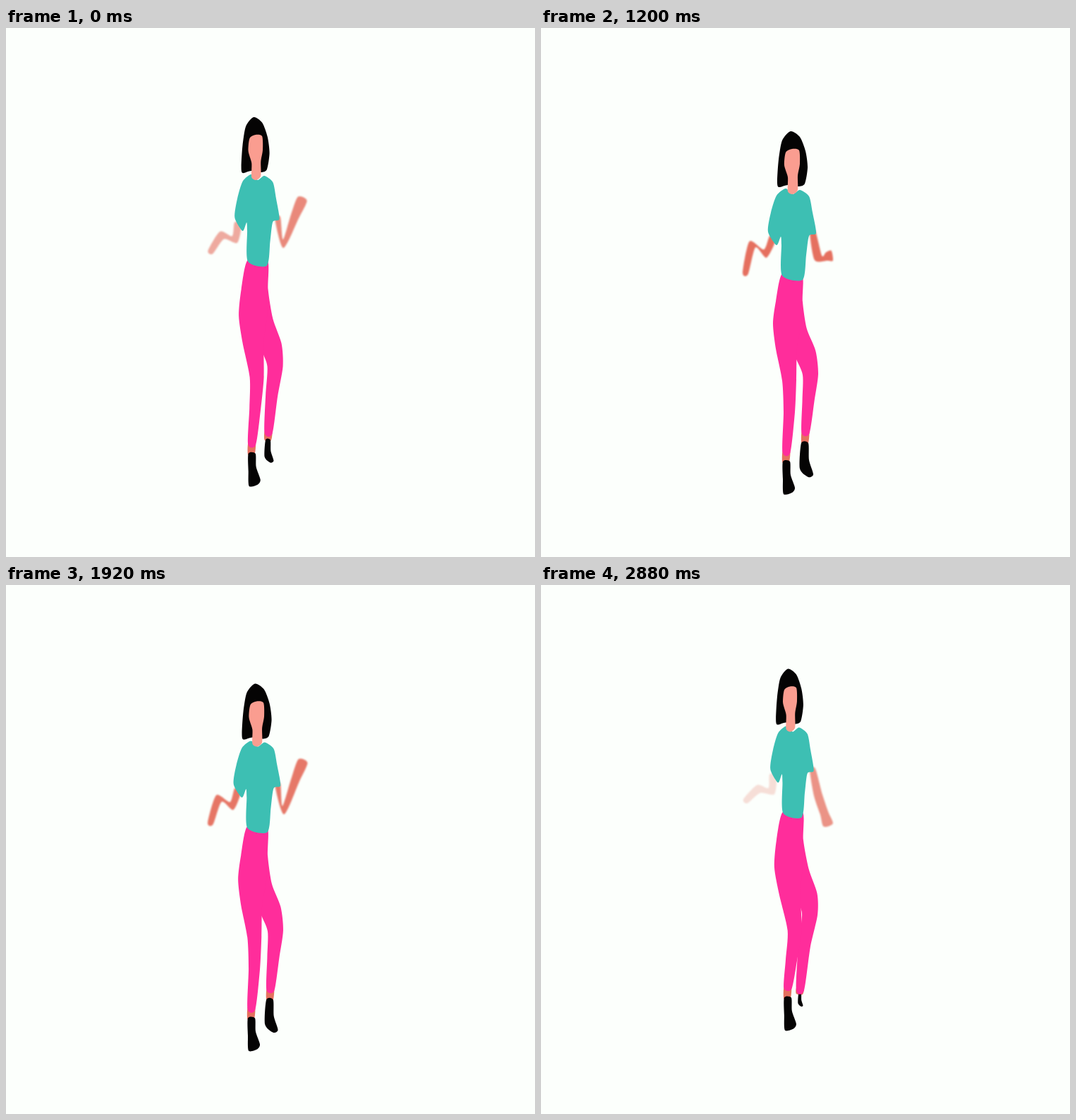
These frames come from a looping animation (748 px wide and 748 px high, 3000 ms). An HTML page with a canvas:

```html
<!DOCTYPE html>
<html lang="en">
<head>
<meta charset="utf-8">
<title>Dancer</title>
<style>
html, body { margin: 0; width: 100%; height: 100%; overflow: hidden; background: #fcfffc; }
canvas { display: block; width: 748px; height: 748px; }
</style>
</head>
<body>
<canvas id="stage" width="748" height="748"></canvas>
<script>
const ctx = document.getElementById('stage').getContext('2d');
const LOOP = 3000, STEP = 120, AXIS = 355;
const SKIN = '#fa9d90', ARM = '#e5705f', BLACK = '#050404', SHIRT = '#3dbfb3', PINK = '#ff2d9b';

// Head and shirt keep their shape; y is measured from the top of the head
const HAIR = [[353, 0], [366, 8], [374, 28], [377, 51], [373, 74], [364, 78], [349, 76], [336, 79], [334, 70], [336, 40], [341, 13]];
const FACE = [[346, 30], [355, 25], [365, 27], [366, 46], [363, 63], [363, 83], [356, 89], [349, 85], [349, 65], [344, 48]];
const BODICE = [[346, 81], [356, 89], [366, 83], [379, 92], [384, 115], [389, 144], [379, 148], [375, 175], [370, 210],
  [341, 204], [340, 161], [339, 149], [333, 161], [321, 142], [325, 115], [333, 91]];

// Leg joints: standing x, y, radius, then the shift at the top of a hop
const FRONT_LEG = [
  [355, 349, 14, 1, -27], [350, 388, 18, 1, -27], [348, 419, 20, 2, -21], [347, 453, 15, 5, -17],
  [351, 498, 10, 8, -10], [351, 543, 8, 3, -12], [347, 600, 5.5, 2, -31]
];
const BACK_LEG = [
  [355, 349, 14, 1, -27], [358, 388, 12, 1, -27], [361, 428, 15, 3, -24], [374, 461, 15, 2, -22],
  [381, 490, 11, -1, -25], [378, 527, 8.5, -6, -16], [374, 573, 5.5, -8, 0]
];

// Boots are placed relative to the end of the trouser leg
const FRONT_BOOT = [[-5, 13], [5, 13], [6, 32], [12, 50], [8, 57], [-4, 59], [-5, 38]];
const BACK_BOOT = [[-6, 14], [4, 14], [5, 38], [11, 58], [4, 62], [-8, 50]];

// Fills a smooth closed curve through the points
function blob(points, color) {
  const n = points.length;
  const at = i => points[(i + n) % n];
  ctx.beginPath();
  ctx.moveTo(...at(0));
  for (let i = 0; i < n; i++) {
    const [a, b, c, d] = [at(i - 1), at(i), at(i + 1), at(i + 2)];
    ctx.bezierCurveTo(
      b[0] + (c[0] - a[0]) / 8, b[1] + (c[1] - a[1]) / 8,
      c[0] - (d[0] - b[0]) / 8, c[1] - (d[1] - b[1]) / 8, ...c);
  }
  ctx.fillStyle = color;
  ctx.fill();
}

// Fills a tapered tube around joints given as x, y, radius
function limb(joints, color) {
  const side = sign => joints.map(([x, y, r], i) => {
    const a = joints[Math.max(0, i - 1)], b = joints[Math.min(joints.length - 1, i + 1)];
    const dx = b[0] - a[0], dy = b[1] - a[1], k = sign * r / Math.hypot(dx, dy);
    return [x - dy * k, y + dx * k];
  });
  blob([...side(1), ...side(-1).reverse()], color);
}

// The hips rise at once, the feet leave the floor later
function poseLeg(leg, lift) {
  return leg.map(([x, y, r, dx, dy], i) => {
    const k = lift ** (1 + 2 * i / (leg.length - 1));
    return [x + dx * k, y + dy * k, r];
  });
}

function drawFoot(leg, boot, size) {
  const [x, y] = leg[leg.length - 1];
  limb([[x, y - 3, 5], [x - 1, y + 15 * size, 4.5]], ARM);
  blob(boot.map(([dx, dy]) => [x + dx * size, y + dy * size]), BLACK);
}

function drawArms(lift, beat, head) {
  ctx.save();
  ctx.translate(0, head);
  ctx.filter = 'blur(1.3px)';

  const elbow = 317 + 9 * lift;
  ctx.globalAlpha = 1 - 0.8 * lift ** 2;
  limb([[328, 150, 5], [elbow, 173, 6], [elbow - 18, 160 + 10 * lift, 6], [289, 201 - 14 * lift, 4]], ARM);

  // The other forearm swings down on every second hop
  const swing = Math.cos(Math.PI * (beat - 0.4));
  const reach = 22 - 8 * swing, drop = 65 * swing - 22;
  ctx.globalAlpha = 1 - 0.25 * lift;
  limb([[384, 142, 4], [392, 179, 6], [392 + reach * 0.6, 179 + drop * 0.6, 6], [392 + reach, 179 + drop, 7]], ARM);
  ctx.restore();
}

function draw(now) {
  const t = Math.floor(now % LOOP / STEP) * STEP / 1000;
  const beat = -2.32 + 2.12 * t - 0.16 * t * t; // one hop per unit, slowing a little
  const lift = (1 - Math.cos(2 * Math.PI * beat)) / 2;
  const head = 146 - 28 * lift;
  const front = poseLeg(FRONT_LEG, lift), back = poseLeg(BACK_LEG, lift);
  const upper = (shape, sway) => shape.map(([x, y]) => [AXIS + (x - AXIS) * (1 - 0.1 * lift) + sway * lift, y + head]);

  ctx.fillStyle = '#fcfffc';
  ctx.fillRect(0, 0, 748, 748);
  drawArms(lift, beat, head);

  ctx.save();
  ctx.filter = 'blur(0.6px)';
  drawFoot(back, BACK_BOOT, 1 - 0.65 * lift ** 2);
  drawFoot(front, FRONT_BOOT, 1);
  limb(back, PINK);
  limb(front, PINK);
  blob(upper(HAIR, -4), BLACK);
  blob(upper(BODICE, 0), SHIRT);
  blob(upper(FACE, -3), SKIN);
  ctx.restore();
  requestAnimationFrame(draw);
}
requestAnimationFrame(draw);
</script>
</body>
</html>
```
